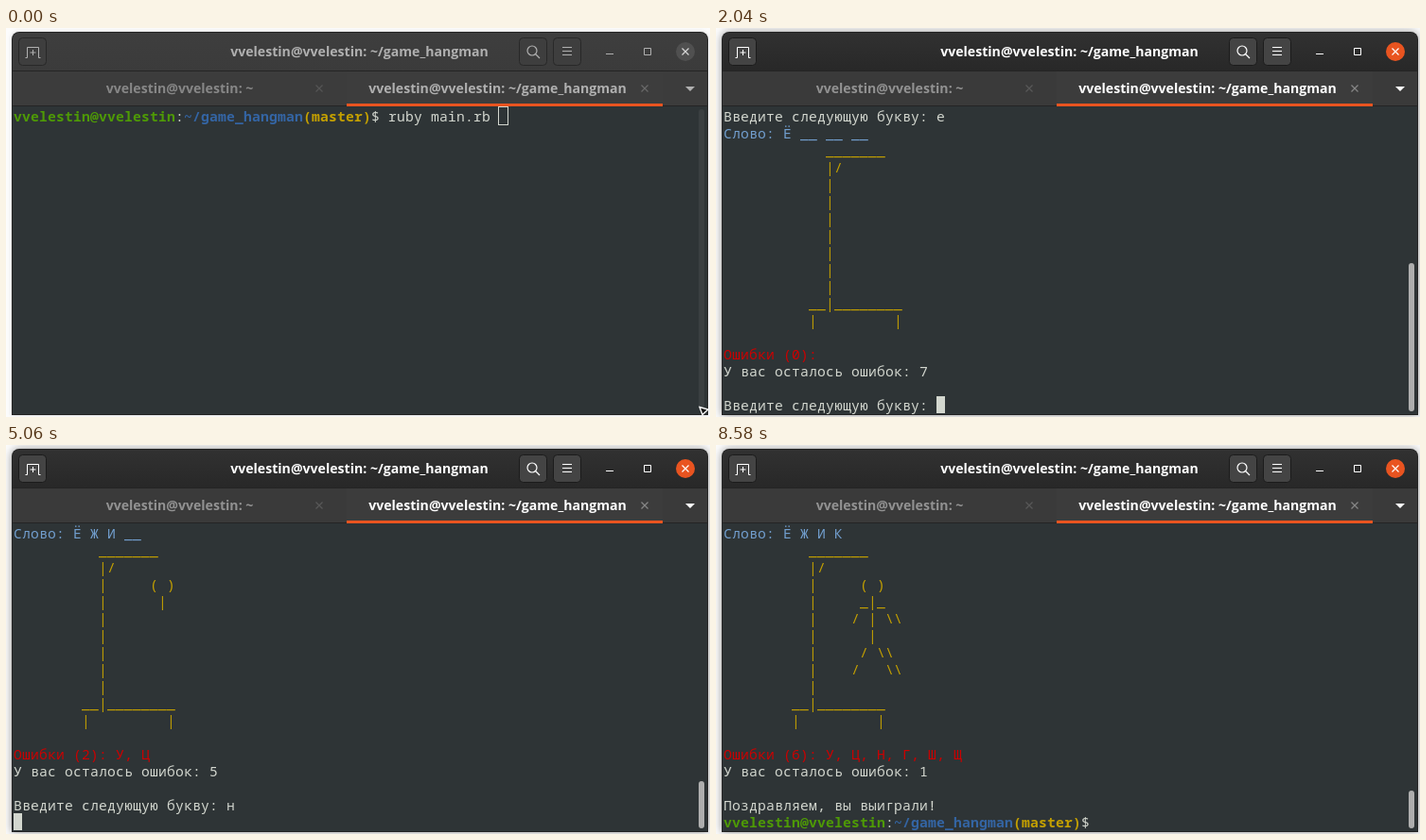
Recreate the animation shown at these times as an HTML page with a canvas. Size 744x412 px, loop 8700 ms.

```html
<!DOCTYPE html>
<html lang="ru">
<meta charset="utf-8">
<title>Hangman</title>
<style>
  html, body { margin: 0; width: 100%; height: 100%; overflow: hidden; background: #fcfcfc }
  canvas { display: block }
</style>
<canvas id="stage" width="744" height="412"></canvas>
<script>
const c = document.getElementById('stage').getContext('2d');
const LOOP = 8700, ROWS = 18, CELL = 9, LINE = 18;
const USER = 'vvelestin@vvelestin', DIR = '~/game_hangman';
const FG = '#d3d7cf', GREEN = '#4e9a06', BLUE = '#3465a4', SKY = '#729fcf',
      YELLOW = '#c4a000', RED = '#cc0000', ORANGE = '#e95420';
const WORD = [...'ЁЖИК'];
const START = 1140, READY = 1240, CURSOR_OFF = 8220;

// letter, time typed, time Enter is pressed
const GUESSES = [
  ['е', 1640, 1980], ['ж', 2380, 2640], ['и', 3020, 3240], ['у', 3600, 3880],
  ['ц', 4220, 4440], ['н', 4780, 5060], ['г', 5380, 5600], ['ш', 5960, 6160],
  ['щ', 6440, 6780], ['к', 7140, 7500]
];

const ramp = (t, a, b) => Math.min(1, Math.max(0, (t - a) / (b - a)));
const grey = (a, b, k) => { const v = Math.round(a + (b - a) * k); return `rgb(${v},${v},${v})`; };

// A line is a list of [text, colour, bold]
const shell = cmd => [[USER, GREEN, 1], [':', FG], [DIR, BLUE, 1], ['(master)', YELLOW, 1], ['$ ' + cmd, FG]];
const ask = letter => [['Введите следующую букву: ' + letter, FG]];

function gallows(n) {
  const arms = String.raw`    /   \\`;
  const body = [
    n > 0 ? '     ( )' : '',
    ['', '', '      |', '     _|'][n] ?? '     _|_',
    n > 4 ? String.raw`    / | \\` : n > 3 ? arms : n > 2 ? '    /' : '',
    n > 4 ? '      |' : '',
    n > 5 ? String.raw`     / \\` : '',
    n > 5 ? arms : '',
    ''
  ];
  const pad = ' '.repeat(n ? 8 : 10);
  return ['  _______', '  |/', ...body.map(s => '  |' + s), '__|________', '|         |']
    .map(s => [[pad + s, YELLOW]]);
}

function report(found, bad) {
  const shown = WORD.map(l => found.includes(l) ? l : '__').join(' ');
  return [
    [['Слово: ' + shown, SKY]],
    ...gallows(bad.length),
    [],
    [[`Ошибки (${bad.length}): ${bad.join(', ')}`, RED]],
    [['У вас осталось ошибок: ' + (7 - bad.length), FG]],
    []
  ];
}

// Everything printed in the terminal up to time t
function output(t) {
  const log = [shell('ruby main.rb ')], found = [], bad = [];
  if (t < START) return log;
  log.push([]);
  if (t < READY) return log;
  log.push(...report(found, bad), ask(''));
  for (const [letter, typed, enter] of GUESSES) {
    if (t < typed) break;
    log[log.length - 1] = ask(letter);
    if (t < enter) break;
    if (t < enter + 20) { log.push([]); break; }
    const up = letter === 'е' ? 'Ё' : letter.toUpperCase();
    (WORD.includes(up) ? found : bad).push(up);
    log.push(...report(found, bad));
    if (found.length < WORD.length) log.push(ask(''));
    else log.push([['Поздравляем, вы выиграли!', FG]], shell(''));
  }
  return log;
}

function box(x, y, w, h, r, fill, stroke) {
  c.beginPath();
  c.roundRect(x, y, w, h, r);
  if (fill) { c.fillStyle = fill; c.fill(); }
  if (stroke) { c.strokeStyle = stroke; c.stroke(); }
}

function path(d, colour, width = 1) {
  c.strokeStyle = colour;
  c.lineWidth = width;
  c.stroke(new Path2D(d));
  c.lineWidth = 1;
}

function cross(x, y, r, colour) {
  path(`M${x - r} ${y - r}l${2 * r} ${2 * r}M${x + r} ${y - r}l${-2 * r} ${2 * r}`, colour, 1.2);
}

function label(text, x, y, colour) {
  c.font = '700 14.1px "Open Sans", sans-serif';
  c.textAlign = 'center';
  c.fillStyle = colour;
  c.fillText(text, x, y);
}

function drawWindow(k) {
  c.fillStyle = '#fcfcfc';
  c.fillRect(0, 0, 744, 412);
  c.shadowColor = `rgba(0,0,0,${0.15 + 0.25 * k})`;
  c.shadowBlur = 4 + 6 * k;
  box(6, 4, 736, 406, [8, 8, 0, 0], '#242424');
  c.shadowColor = 'transparent';

  const bar = c.createLinearGradient(0, 5, 0, 45);
  bar.addColorStop(0, grey(62, 49, k));
  bar.addColorStop(1, grey(59, 40, k));
  box(7, 5, 734, 40, [7, 7, 0, 0], bar);
  c.fillStyle = grey(60, 58, k);
  c.fillRect(7, 46, 734, 36);
  c.fillStyle = grey(61, 60, k);
  c.fillRect(360, 46, 334, 36);
  c.fillStyle = '#2e3436';
  c.fillRect(7, 83, 734, 326);
  c.fillStyle = ORANGE;
  c.fillRect(360, 80, 334, 3);

  const ink = grey(176, 255, k), edge = grey(40, 27, k);
  for (const x of [13.5, 542.5, 578.5]) box(x, 10.5, 29, 29, 4, grey(62, 68, k), edge);
  path('M20.5 31.5h2v-11h12v11h2M28.5 23v6M25.5 26h6', ink);
  path('M561 24a5 5 0 1 1-10 0a5 5 0 1 1 10 0M559.5 27.5l4.5 4.5', ink, 1.2);
  path('M588 20.5h10M588 24.5h10M588 28.5h10', ink, 1.2);
  path('M634 27.5h8M674.5 21.5h7v7h-7z', ink);
  c.fillStyle = `color-mix(in srgb, ${ORANGE} ${k * 100}%, #505050)`;
  c.beginPath();
  c.arc(718, 25, 10, 0, 7);
  c.fill();
  cross(718, 25, 3.5, grey(215, 255, k));

  label(`${USER}: ${DIR}`, 373.5, 30, ink);
  label(`${USER}: ~`, 183.5, 69, grey(135, 146, k));
  label(`${USER}: ${DIR}`, 519.5, 69, ink);
  cross(331, 64, 3.5, grey(85, 88, k));
  cross(675, 64, 3.5, grey(105, 135, k));
  c.fillStyle = ink;
  c.fill(new Path2D('M718 62h10l-5 5z'));
}

function drawTerminal(t, k) {
  const log = output(t), rows = log.slice(-ROWS);
  c.textAlign = 'left';
  let col = 0;
  rows.forEach((line, row) => {
    col = 0;
    for (const [text, colour, bold] of line) {
      c.font = `${bold ? 700 : 400} 14.67px "Noto Sans Mono", monospace`;
      c.fillStyle = colour;
      for (const ch of text) c.fillText(ch, 8 + CELL * col++, 99 + LINE * row);
    }
  });

  const x = 8 + CELL * col, y = 84 + LINE * (rows.length - 1);
  if (k < 0.5) {
    c.strokeStyle = FG;
    c.strokeRect(x - 0.5, y - 0.5, 10, 19);
  } else if (t < CURSOR_OFF) {
    c.fillStyle = FG;
    c.fillRect(x, y, CELL, LINE);
  }

  const thumb = Math.max(40, 326 * ROWS / Math.max(ROWS, log.length) - 6);
  c.globalAlpha = 0.07 + 0.93 * ramp(t, 140, 500);
  box(732, 406 - thumb, 6, thumb, 3, grey(211, 174, ramp(t, 580, 780)));
  c.globalAlpha = 1;
}

function drawPointer() {
  const d = 'M733 401.5l9 2.5l-6 5.5z';
  c.fillStyle = '#111';
  c.fill(new Path2D(d));
  path(d, '#fff', 1.3);
}

function frame() {
  const t = performance.now() % LOOP, focus = ramp(t, 140, 400);
  drawWindow(focus);
  drawTerminal(t, focus);
  if (t < 200) drawPointer();
  requestAnimationFrame(frame);
}
frame();
</script>
</html>
```
